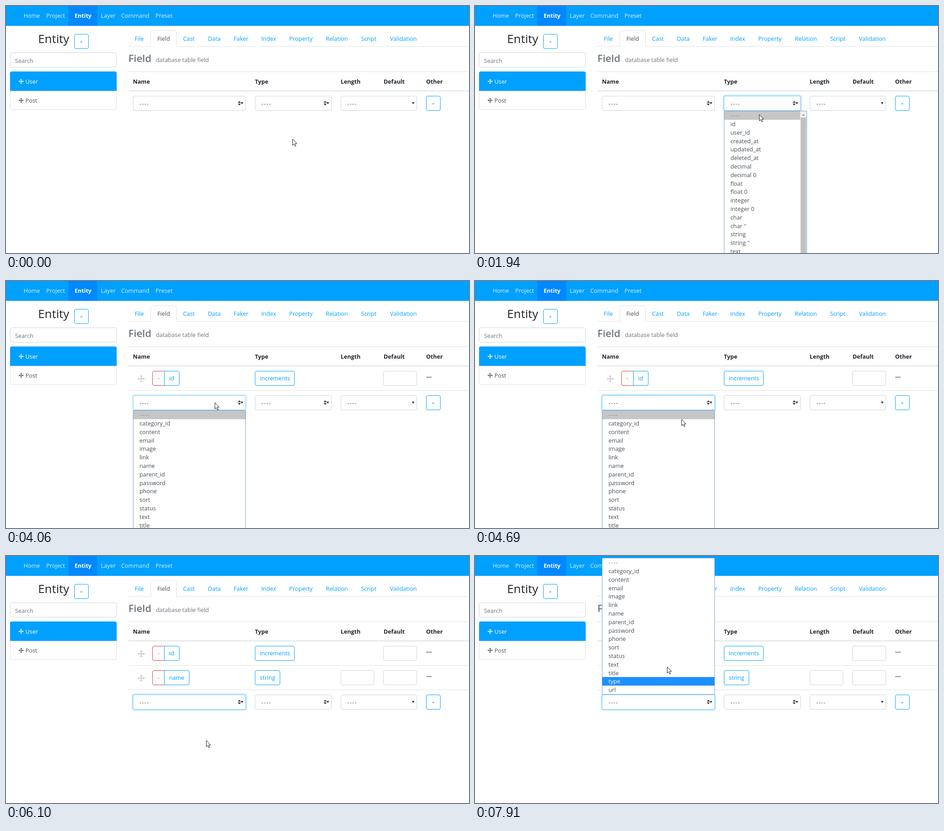
Recreate the animation shown at these times as an HTML page with a canvas. Size 1025 by 547 pixels, loop 7.99 s.

```html
<!DOCTYPE html>
<html lang="en">
<head>
<meta charset="utf-8">
<title>Entity field editor</title>
<style>
  html, body { margin: 0; width: 100%; height: 100%; overflow: hidden; background: #fff; }
  canvas { display: block; }
</style>
</head>
<body>
<canvas id="stage" width="1025" height="547"></canvas>
<script>
const ctx = document.getElementById('stage').getContext('2d');
const LOOP = 7990, STEP = 80, ROW = 18.8;
const BLUE = '#00a0ff', RED = '#dc3545', INK = '#212529', TEXT = '#495057',
      MUTED = '#6c757d', EDGE = '#ced4da', LINE = '#dee2e6';
const FAMILY = '"Open Sans", "Noto Sans", sans-serif';
const BODY = `12.8px ${FAMILY}`, BOLD = `bold 12.6px ${FAMILY}`;

const NAMES = ['----', 'category_id', 'content', 'email', 'image', 'link', 'name', 'parent_id',
  'password', 'phone', 'sort', 'status', 'text', 'title', 'type', 'url'];
const TYPES = ['----', 'id', 'user_id', 'created_at', 'updated_at', 'deleted_at', 'decimal',
  'decimal 0', 'float', 'float 0', 'integer', 'integer 0', 'char', "char ''", 'string',
  "string ''", 'text'];

// Pointer moves: start time, number of steps, end x, end y, eased
const START = [634, 294];
const MOVES = [
  [840, 6, 633, 221, true],
  [1390, 1, 633, 220],
  [1860, 2, 629, 240],
  [2020, 3, 619, 264],
  [3190, 6, 462, 269, true],
  [4530, 9, 443, 412, true],
  [5790, 1, 443, 411],
  [6100, 9, 443, 324, true],
  [7750, 3, 425, 245]
];
// Click halos: start, end
const CLICKS = [[1550, 1630], [2490, 2570], [3980, 4060], [5320, 5480], [6890, 6970]];

function pointerAt(t) {
  let [x, y] = START;
  for (const [start, steps, endX, endY, eased] of MOVES) {
    if (t < start) break;
    let p = Math.min(1, (Math.floor((t - start) / STEP) + 1) / steps);
    if (eased) p = p * p * (3 - 2 * p);
    x += (endX - x) * p;
    y += (endY - y) * p;
  }
  return [Math.round(x), Math.round(y)];
}

function fill(x, y, w, h, color) {
  ctx.fillStyle = color;
  ctx.fillRect(x, y, w, h);
}

function label(text, x, y, color, font = BODY, align = 'left') {
  ctx.font = font;
  ctx.fillStyle = color;
  ctx.textAlign = align;
  ctx.fillText(text, x, y);
}

function dashes(x, y, color) {
  for (let i = 0; i < 4; i++) label('-', x + i * 5.4, y, color);
}

function box(x, y, w, h, color, radius = 3.5, back = '#fff') {
  ctx.beginPath();
  ctx.roundRect(x + 0.5, y + 0.5, w - 1, h - 1, radius);
  ctx.fillStyle = back;
  ctx.fill();
  ctx.strokeStyle = color;
  ctx.lineWidth = 1;
  ctx.stroke();
}

function polygon(points, color) {
  ctx.beginPath();
  points.forEach(([x, y]) => ctx.lineTo(x, y));
  ctx.closePath();
  ctx.fillStyle = color;
  ctx.fill();
}

function triangle(x, y, half, height, color) {
  polygon([[x - half, y], [x + half, y], [x, y + height]], color);
}

function moveIcon(x, y, r, color) {
  ctx.save();
  ctx.translate(x, y);
  for (let i = 0; i < 4; i++) {
    fill(-r * 0.12, -r * 0.7, r * 0.24, r * 0.7, color);
    triangle(0, -r * 0.58, r * 0.4, -r * 0.42, color);
    ctx.rotate(Math.PI / 2);
  }
  ctx.restore();
}

function plusButton(x, y) {
  box(x, y, 32, 33, BLUE);
  label('+', x + 16, y + 21, BLUE, `11px ${FAMILY}`, 'center');
}

function select(x, y, w, focus, custom) {
  if (focus) {
    ctx.beginPath();
    ctx.roundRect(x - 2.5, y - 2.5, w + 5, 38, 6);
    ctx.fillStyle = `rgba(0,160,255,${0.25 * focus})`;
    ctx.fill();
  }
  box(x, y, w, 33, focus ? '#80d0ff' : EDGE);
  dashes(x + 14.5, y + 22, TEXT);
  const right = x + w;
  if (custom) {
    triangle(right - 14.5, y + 15.3, 3.5, -4, '#343a40');
    triangle(right - 14.5, y + 17.3, 3.5, 4, '#343a40');
  }
  triangle(right - 8.5, y + 14, 2.7, 5, '#343a40');
}

function drawHeader() {
  fill(0, 0, 1025, 44, BLUE);
  fill(138, 0, 64, 44, '#0088ff');
  const items = [['Home', 39], ['Project', 89], ['Layer', 210], ['Command', 255], ['Preset', 331]];
  items.forEach(([text, x]) => label(text, x, 26, 'rgba(255,255,255,.85)'));
  label('Entity', 152, 26, '#fff', BOLD);
}

function drawSidebar() {
  label('Entity', 71, 82, INK, `500 26.2px ${FAMILY}`);
  plusButton(151, 62);
  box(9, 103, 236, 33, EDGE);
  label('Search', 20, 126, MUTED);
  box(9, 145, 236, 85, '#dfdfdf');
  ctx.beginPath();
  ctx.roundRect(9, 145, 236, 43, [4, 4, 0, 0]);
  ctx.fillStyle = BLUE;
  ctx.fill();
  moveIcon(33.5, 167, 5.5, '#fff');
  label('User', 43, 172, '#fff');
  moveIcon(33.5, 209, 5.5, TEXT);
  label('Post', 43, 214, TEXT);
}

function drawTabs() {
  fill(271, 89, 754, 1, LINE);
  box(320, 54, 58, 40, LINE, 4);
  fill(319, 89, 60, 6, '#fff');
  fill(319, 89, 2, 1, LINE);
  fill(377, 89, 2, 1, LINE);
  const tabs = [['File', 285], ['Field', 335], ['Cast', 392], ['Data', 447], ['Faker', 504],
    ['Index', 565], ['Property', 627], ['Relation', 708], ['Script', 786], ['Validation', 850]];
  tabs.forEach(([text, x]) => label(text, x, 77, text === 'Field' ? TEXT : BLUE));
  label('Field', 271, 124, MUTED, `600 22.2px ${FAMILY}`);
  label('database table field', 332, 124, MUTED);
}

function drawField(y, name, nameWidth, type, typeWidth, hasLength) {
  moveIcon(299.5, y + 17.5, 8, '#ccc');
  box(324, y, 28, 33, RED, [3.5, 0, 0, 3.5]);
  label('-', 337.5, y + 21, RED, BODY, 'center');
  box(350, y, nameWidth, 33, BLUE, [0, 3.5, 3.5, 0]);
  label(name, 361, y + 21, BLUE);
  box(551, y, typeWidth, 33, BLUE);
  label(type, 562, y + 21, BLUE);
  if (hasLength) box(741, y, 74, 33, EDGE);
  box(835, y, 75, 33, EDGE);
  for (let i = 0; i < 4; i++) fill(931 + i * 3, y + 13, 1.5, 2, INK);
  fill(271, y + 43, 754, 1, LINE);
}

function drawTable(t) {
  fill(271, 145, 754, 1, LINE);
  fill(271, 187, 754, 2, LINE);
  const heads = [['Name', 281], ['Type', 551], ['Length', 741], ['Default', 836], ['Other', 930]];
  heads.forEach(([text, x]) => label(text, x, 172, INK, BOLD));

  const rows = t >= 5480 ? 2 : t >= 2570 ? 1 : 0;
  if (rows > 0) drawField(199, 'id', 34, 'increments', 88, false);
  if (rows > 1) drawField(253, 'name', 56, 'string', 56, true);

  const y = 199 + 54 * rows;
  const nameFocus = t < 4060 ? 0 : t < 4140 ? 0.5 : 1;
  const typeFocus = t < 1630 || t >= 4060 ? 0 : t < 1700 ? 0.5 : 1;
  select(281, y, 250, nameFocus, true);
  select(551, y, 170, typeFocus, true);
  select(741, y, 169, 0, false);
  plusButton(930, y);
}

function drawMenu(options, x, y, width, height, hoverY, scrollbar) {
  const top = y + 0.8;
  const rowWidth = width - (scrollbar ? 16 : 2);
  const row = Math.floor((hoverY - top) / ROW);
  const active = row > 0 && row < options.length ? row : 0;
  box(x, y, width, height, '#7b9fd4', 0);
  fill(x + 1, Math.round(top + active * ROW), rowWidth, 19, active ? '#1e90ff' : '#c6c6c6');
  options.forEach((text, i) => {
    const base = Math.round(top + i * ROW + 14.4);
    if (i === 0) dashes(x + 14.5, base, '#868686');
    else label(text, x + 14.5, base, i === active ? '#fff' : TEXT);
  });
  if (scrollbar) {
    const left = x + width - 15;
    fill(left, y + 1, 14, height, '#f1f1f1');
    triangle(left + 7, y + 11, 3.5, -4, '#a3a3a3');
    fill(left + 1, y + 15, 12, height, '#c1c1c1');
  }
}

function drawPointer(x, y) {
  ctx.beginPath();
  [[0, 0], [0, 14], [3, 11], [5.5, 16], [7.5, 15], [5.3, 10.2], [9.5, 10]]
    .forEach(([dx, dy]) => ctx.lineTo(x + 0.5 + dx, y + 0.5 + dy));
  ctx.closePath();
  ctx.fillStyle = '#fff';
  ctx.fill();
  ctx.strokeStyle = '#1b1b2b';
  ctx.lineWidth = 1;
  ctx.stroke();
}

function draw(t) {
  fill(0, 0, 1025, 547, '#fff');
  drawHeader();
  drawSidebar();
  drawTabs();
  drawTable(t);

  // Menu highlighting trails the pointer by one step
  const hoverY = pointerAt(t - STEP)[1];
  if (t >= 1630 && t < 2570) drawMenu(TYPES, 551, 232, 184, 330, hoverY, true);
  if (t >= 4060 && t < 5480) drawMenu(NAMES, 281, 286, 250, 303, hoverY);
  if (t >= 6970) drawMenu(NAMES, 281, 4, 250, 303, hoverY);

  const [x, y] = pointerAt(t);
  if (CLICKS.some(([from, to]) => t >= from && t < to)) {
    ctx.beginPath();
    ctx.arc(x + 0.5, y, 10.2, 0, Math.PI * 2);
    ctx.fillStyle = 'rgba(255,245,0,.55)';
    ctx.fill();
  }
  drawPointer(x, y);
}

const begin = performance.now();
function tick() {
  draw((performance.now() - begin) % LOOP);
  requestAnimationFrame(tick);
}
tick();
</script>
</body>
</html>
```
